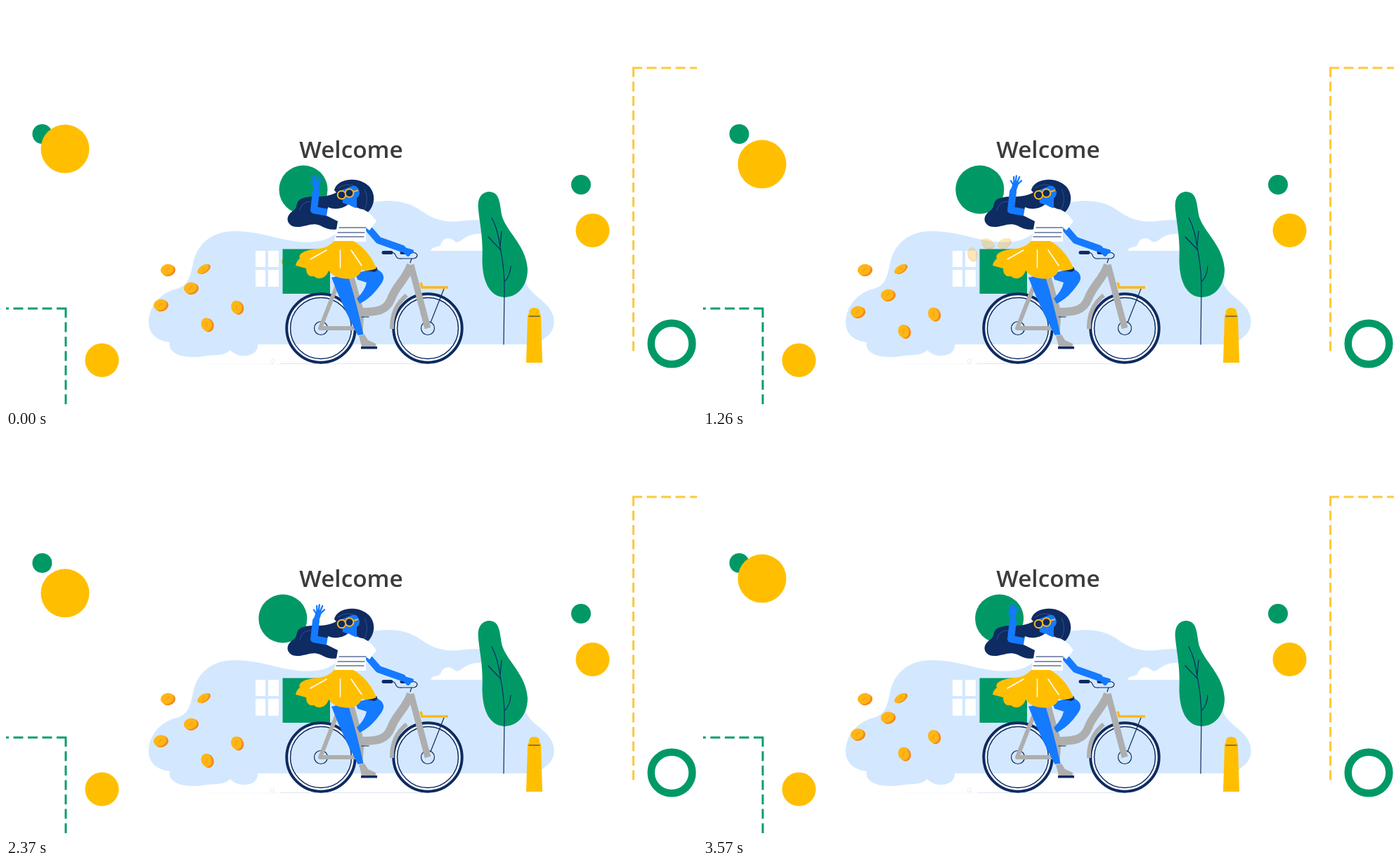
An HTML page that plays this animation: 983x570 px, repeating every 3600 ms.

```html
<!DOCTYPE html>
<html lang="en">
<head>
<meta charset="utf-8">
<title>Welcome</title>
<style>
  html, body { margin: 0; height: 100%; overflow: hidden; background: #fff; }
  svg { display: block; width: 983px; height: 570px; }
  text { font: 600 33.4px "Open Sans", "Noto Sans", sans-serif; fill: #3b3b3b; }
  .green { fill: #096; }
  .gold { fill: #ffbf00; }
  .sky { fill: #d3e8fe; }
  .navy { fill: #0e2b62; }
  .blue { fill: #147aff; }
  .white { fill: #fff; }
  .line { fill: none; stroke: #0e2b62; stroke-width: 1.2; stroke-linecap: round; }
  .grey { fill: none; stroke: #aeaeae; stroke-linejoin: round; }
  .limb { fill: none; stroke: #147aff; stroke-linejoin: round; stroke-linecap: round; }
  .dash { fill: none; stroke-width: 3; stroke-dasharray: 14 6.5; }
</style>
</head>
<body>
<svg viewBox="0 0 983 570">
  <defs>
    <g id="coin">
      <ellipse cx="1" cy="1.5" rx="9.8" ry="8" fill="#f58a1a"/>
      <ellipse cx="-.6" cy="-.6" rx="9.4" ry="7.6" fill="#ffb514"/>
      <path d="M-3 1L3-2" fill="none" stroke="#f9a01a" stroke-width="1.5"/>
    </g>
    <g id="wheel" class="line">
      <circle r="45.500" stroke="#fff" stroke-width="4"/>
      <circle r="48.700" stroke-width="4"/>
      <circle r="43.500" stroke-width="1.500"/>
      <circle r="9.500"/>
    </g>
  </defs>

  <!-- Loose decorations -->
  <path class="dash" stroke="#ffc83d" d="M892.5 87V491M891 88H983"/>
  <path class="dash" stroke="#0a9f6c" d="M85 429V567M86 430H0"/>
  <circle class="green" cx="51.5" cy="182" r="14"/>
  <circle class="gold" id="sun" cx="84" cy="203" r="34.5"/>
  <circle class="gold" cx="136.5" cy="503.5" r="24"/>
  <circle class="green" cx="818" cy="254" r="14"/>
  <circle class="gold" cx="834.5" cy="319" r="24"/>
  <circle cx="947" cy="480" r="29.3" fill="none" stroke="#096" stroke-width="10.5"/>
  <text x="491" y="216" text-anchor="middle">Welcome</text>

  <!-- Scenery -->
  <path class="sky" d="M233 478C215 476 203 466 203 450C203 425 222 408 239 403C259 399 262 386 266 366C272 337 294 320 325 320C370 320 398 339 440 335C485 330 485 290 523 279C552 274 573 279 589 290C608 304 625 308 645 306C660 304 675 302 690 308L738 385C740 404 755 411 765 421C784 437 784 460 768 471C758 480 750 481 735 481H358C360 497 333 504 319 489C309 499 292 495 281 498C252 502 229 494 233 478Z"/>
  <path class="white" d="M604 348C607 341 613 344 618 340C622 327 633 329 639 335C649 339 650 322 680 324V348Z"/>
  <path class="white" d="M355 348H369V371H355ZM373 348H388V371H373ZM355 375H369V399H355ZM373 375H388V399H373Z"/>
  <path class="green" d="M672 289C670 270 679 264 688 264C704 265 702 284 706 300C714 323 740 341 742 374C742 400 726 414 709 414C688 413 678 392 677.500 362C679 328 674 312 672 289Z"/>
  <path class="line" stroke-width=".8" d="M708 481L709 402Q709 372 703 343Q700 318 691 301M704 347L686 328M703 341L705 320M710 391Q717 384 718 370"/>
  <path class="gold" d="M742 441Q742 438 744 437Q743 429 751.500 429Q760 429 759 437Q761 438 761 441L763 507H740Z"/>
  <path class="line" d="M744 441H759"/>
  <path d="M390 508.500H600" stroke="#dbe6f2"/>
  <path d="M288 509H390" stroke="#f3f6fa"/>
  <path d="M376 504Q379 500 382 503L380 508Q376 508 376 504" fill="none" stroke="#e8ebf0"/>
  <g id="coins"></g>
  <circle class="green" id="ball" cx="423" cy="261" r="34.500"/>
  <g id="sparks"></g>
  <path class="green" d="M393.500 345.500H461V409H393.500Z"/>

  <!-- Bicycle -->
  <use href="#wheel" transform="translate(448 458)"/>
  <use href="#wheel" transform="translate(600 458)"/>
  <path class="grey" stroke-width="6" d="M471 397L447 458H500M549 459Q548 429 570 411"/>
  <path class="grey" stroke-width="9" d="M490 382L505 436L503 464M576 368L600 458"/>
  <path class="grey" stroke-width="12" d="M576 368C568 390 555 397 548 416C541 433 530 435 504 435"/>
  <path class="line" d="M623 402L604 450M506 442H516M575 365L577 359"/>
  <path class="line" d="M548 350Q553 350 555 356Q557 360 564 359H580Q585 358 585 354Q584 350 575 350H564"/>
  <path d="M537 350.500H548M563 350.500H574" stroke="#0e2b62" stroke-width="5" stroke-linecap="round"/>
  <path d="M590 393L592 400H629" fill="none" stroke="#fdb913" stroke-width="3.500"/>

  <!-- Rider -->
  <path class="blue" d="M497 380L524 373C537 377 541 386 533 396Q519 416 503 423L499 416Q511 404 513 393L500 389Z"/>
  <path class="navy" d="M511 371L527 371Q531 376 524 378L511 376Z"/>
  <path class="blue" d="M463 386L486 381Q499 423 508.500 467L500.500 468Q479 428 463 386Z"/>
  <path d="M502 469L510 467L515 475L526 480V484H506Z" fill="#aeaeae"/>
  <path class="navy" d="M505 484H528V487.500H505Z"/>
  <path class="navy" d="M470 265C451 275 437 268 423 273C409 277 418 286 407 292C395 301 401 314 414 314C427 314 435 307 447 312C461 320 475 321 482 307L496 285L515 293C527 281 526 261 511 252C492 241 469 249 467 262Z"/>
  <path d="M418 291Q421 277 434 278M472 259Q485 250 499 257M510 289Q517 275 510 260" fill="none" stroke="#365b9b" stroke-width=".8"/>
  <path class="blue" d="M477 262L492 256Q501 254 503 265Q503 270 499 273V287H488V283L479 280Z"/>
  <g fill="#0e2b62" stroke="#ffb51b" stroke-width="2">
    <circle cx="477.500" cy="268.500" r="5.800"/>
    <circle cx="488.500" cy="266" r="5.800"/>
    <path d="M494 264L501 262"/>
  </g>
  <path class="limb" stroke-width="10" d="M460 294L438 290L441 264"/>
  <path class="limb" stroke-width="10" d="M517 318L530 333L564 345"/>
  <path class="limb" stroke-width="6" d="M562 345L577 349M567 348L572 353"/>
  <g id="hand" class="limb" stroke-width="2.300">
    <path stroke-width="8" d="M441 264L443.500 252"/>
    <path d="M441 252L439.500 243M443 251V241M445 251L447.500 242M446 253L451 247M440 254L436 249"/>
  </g>
  <path class="white" d="M458 286Q473 292 487 282Q498 289 508 289Q519 294 527 306L517 319L512 315V335H467L472 306L456 298Z"/>
  <path class="line" d="M474 315H512M472 322H510M470 328H509"/>
  <path class="gold" d="M467 334H494C511 344 521 358 527 373Q516 378 506 375C502 388 487 389 478 387Q465 385 459 376C455 388 444 390 438 384Q427 386 427 373L412 369Q413 363 418 359C414 350 432 346 444 345Q458 344 467 334Z"/>
  <path d="M456 347L433 360M475.500 347V372M491 347L506 369" stroke="#fff" stroke-width="1.500" stroke-linecap="round"/>
</svg>

<script>
const LOOP = 3600, TURN = 1815, FADE = 1800;
const $ = id => document.getElementById(id);

// x, y, rotation, thickness, drift
const coins = [
  [230, 375, -20, 1, 0], [281, 374, -35, .65, 0], [263, 401, -20, 1, 12.5],
  [220, 425, -20, 1, 12.5], [328.5, 428.5, 75, -1, 12.5], [286, 453, 75, -1, 12.5]
];
// x, y, travel x, travel y, rotation
const sparks = [
  [412, 369, -31, -18, 70], [405, 372, 0, -38, 20], [401, 361, 30, -26, -35]
];

function addCoin(parent) {
  const coin = document.createElementNS("http://www.w3.org/2000/svg", "use");
  coin.setAttribute("href", "#coin");
  parent.append(coin);
  return coin;
}
const coinNodes = coins.map(() => addCoin($("coins")));
const sparkNodes = sparks.map(() => addCoin($("sparks")));

function place(node, x, y, angle, sy) {
  node.setAttribute("transform", `translate(${x} ${y}) rotate(${angle}) scale(1 ${sy})`);
}

function draw(now) {
  const t = now % LOOP;
  const swing = Math.min(t, 2 * TURN - t) / 1620;
  $("sun").setAttribute("cy", 203 + 28 * swing);
  $("ball").setAttribute("cx", 423 - 37.5 * swing);
  $("hand").setAttribute("transform", `rotate(${-10 + 22 * swing} 441 264)`);
  coins.forEach(([x, y, angle, sy, drift], i) =>
    place(coinNodes[i], x, y + drift * swing, angle, sy));

  const left = Math.max(0, 1 - t / FADE);
  const flight = 1 - left * left;
  $("sparks").setAttribute("opacity", left);
  sparks.forEach(([x, y, dx, dy, angle], i) =>
    place(sparkNodes[i], x + dx * flight, y + dy * flight, angle, .8));
}

const start = performance.now();
(function tick() {
  draw(performance.now() - start);
  requestAnimationFrame(tick);
})();
</script>
</body>
</html>
```
